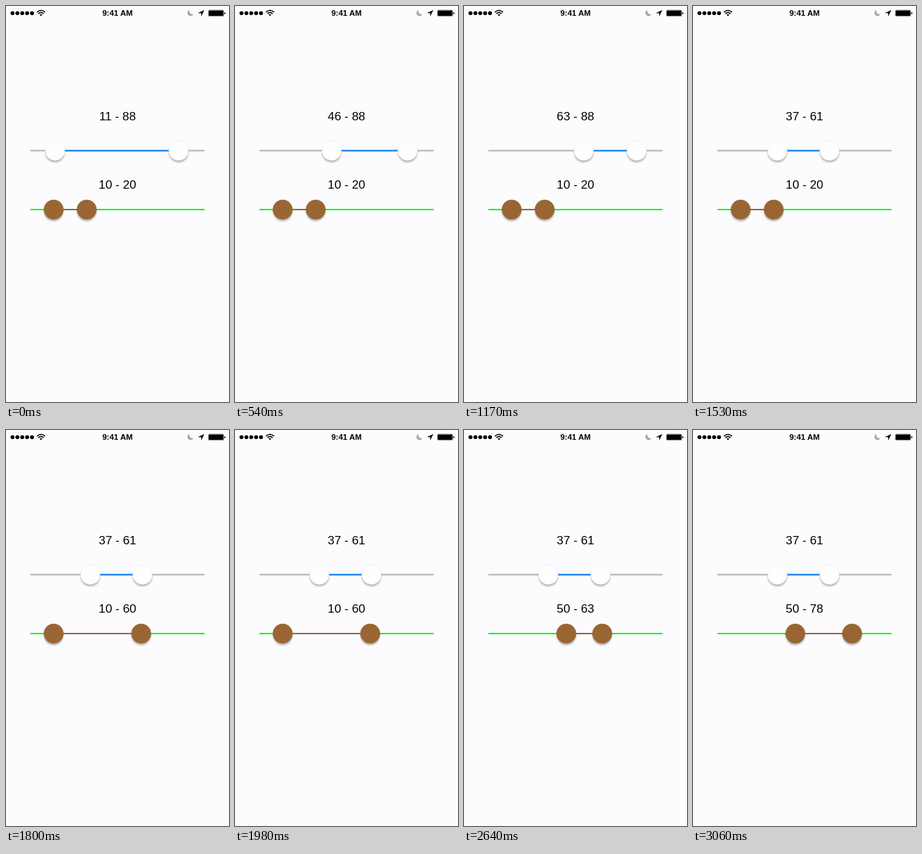
An HTML page for the animation above (3.09 s loop, 320x568 px).

```html
<!DOCTYPE html>
<html lang="en">
<head>
<meta charset="utf-8">
<title>Range sliders</title>
<style>
  html, body { margin: 0; width: 100%; height: 100%; overflow: hidden; background: #fcfcfe; }
  svg { display: block; width: 100%; height: 100%; }
  text { font-family: "Liberation Sans", Arial, sans-serif; text-anchor: middle; }
  .label { font-size: 17.3px; }
  .time { font-size: 11.5px; font-weight: bold; }
  .shadow { fill: #000; opacity: .27; filter: url(#blur); }
  .knob { fill: var(--knob); stroke: var(--edge); stroke-width: .5; }
  .track { fill: var(--track); }
  .range { fill: var(--range); }
  .light { --knob: #fefeff; --edge: #e6e6ec; --track: #b2b2b2; --range: #0a80fc; }
  .dark { --knob: #996633; --edge: #996633; --track: #00fa08; --range: #996633; }
</style>
</head>
<body>
<svg viewBox="0 0 320 568">
  <defs>
    <filter id="blur" x="-30%" y="-30%" width="160%" height="160%">
      <feGaussianBlur stdDeviation="1.2"/>
    </filter>
  </defs>

  <g id="status">
    <circle cx="9.3" cy="10.2" r="2.8"/>
    <circle cx="16.3" cy="10.2" r="2.8"/>
    <circle cx="23.3" cy="10.2" r="2.8"/>
    <circle cx="30.3" cy="10.2" r="2.8"/>
    <circle cx="37.3" cy="10.2" r="2.8"/>
    <g fill="none" stroke="#000" stroke-width="1.6">
      <path d="M44.4 8.9Q50.2 3.6 56 8.9"/>
      <path d="M46.5 11.1Q50.2 7.7 53.9 11.1"/>
    </g>
    <path d="M48.3 12.4Q50.2 10.9 52.1 12.4L50.2 14.4Z"/>
    <text class="time" x="160" y="14.2">9:41 AM</text>
    <path fill="#a8a8a8" d="M263.2 5.8A4.5 4.5 0 1 0 268.9 11.8A4.7 4.7 0 0 1 263.2 5.8Z"/>
    <path d="M284.6 5.7L275.2 10.2H280.1V15Z"/>
    <rect x="290.4" y="6" width="22" height="8.6" rx="1.4" fill="none" stroke="#555" stroke-width=".7"/>
    <rect x="291" y="6.6" width="20.8" height="7.4" rx=".8"/>
    <path d="M313.4 8.7Q315 9.2 315 10.3T313.4 11.9Z"/>
  </g>

  <g class="light slider">
    <text class="label" x="160" y="164">11 - 88</text>
    <rect class="track" x="35" y="206.5" width="250" height="2"/>
    <rect class="range" y="206.5" height="2"/>
    <g class="thumb"><circle class="shadow" cy="2.8" r="14"/><circle class="knob" r="14"/></g>
    <g class="thumb"><circle class="shadow" cy="2.8" r="14"/><circle class="knob" r="14"/></g>
  </g>
  <g class="dark slider">
    <text class="label" x="160" y="262">10 - 20</text>
    <rect class="track" x="35" y="291" width="250" height="2"/>
    <rect class="range" y="291" height="2"/>
    <g class="thumb"><circle class="shadow" cy="2.8" r="14"/><circle class="knob" r="14"/></g>
    <g class="thumb"><circle class="shadow" cy="2.8" r="14"/><circle class="knob" r="14"/></g>
  </g>
</svg>
<script>
  const LOOP = 3090, TICK = 30, UNIT = 1.94, LOW_X = 49, HIGH_X = 77;

  // Each drag: start ms, end ms, target value, optional skew towards a late start.
  const sliders = [
    { y: 207.5, low: { from: 11, drags: [[180, 840, 73], [990, 1320, 37.1, 1.78]] },
                high: { from: 88, drags: [[1320, 1530, 61.3]] } },
    { y: 292, low: { from: 10, drags: [[2100, 2400, 50.4]] },
              high: { from: 20, drags: [[1620, 1800, 60.3], [2520, 3060, 78]] } }
  ];

  const groups = document.querySelectorAll('.slider');
  sliders.forEach((s, i) => {
    s.label = groups[i].querySelector('.label');
    s.range = groups[i].querySelector('.range');
    s.thumbs = groups[i].querySelectorAll('.thumb');
  });

  function valueAt({ from, drags }, t) {
    let value = from;
    for (const [start, end, target, skew = 1] of drags) {
      const u = Math.min(1, Math.max(0, (t - start) / (end - start))) ** skew;
      value += (target - value) * u * u * (3 - 2 * u);
    }
    return value;
  }

  function draw(s, t) {
    const low = valueAt(s.low, t), high = valueAt(s.high, t);
    const a = LOW_X + UNIT * low, b = HIGH_X + UNIT * high;
    s.label.textContent = `${Math.round(low)} - ${Math.round(high)}`;
    s.range.setAttribute('x', a);
    s.range.setAttribute('width', b - a);
    s.thumbs[0].setAttribute('transform', `translate(${a} ${s.y})`);
    s.thumbs[1].setAttribute('transform', `translate(${b} ${s.y})`);
  }

  const began = performance.now();
  function frame() {
    const t = (performance.now() - began) % LOOP;
    const step = Math.floor(t / TICK) * TICK;
    sliders.forEach(s => draw(s, step));
    requestAnimationFrame(frame);
  }
  frame();
</script>
</body>
</html>
```
